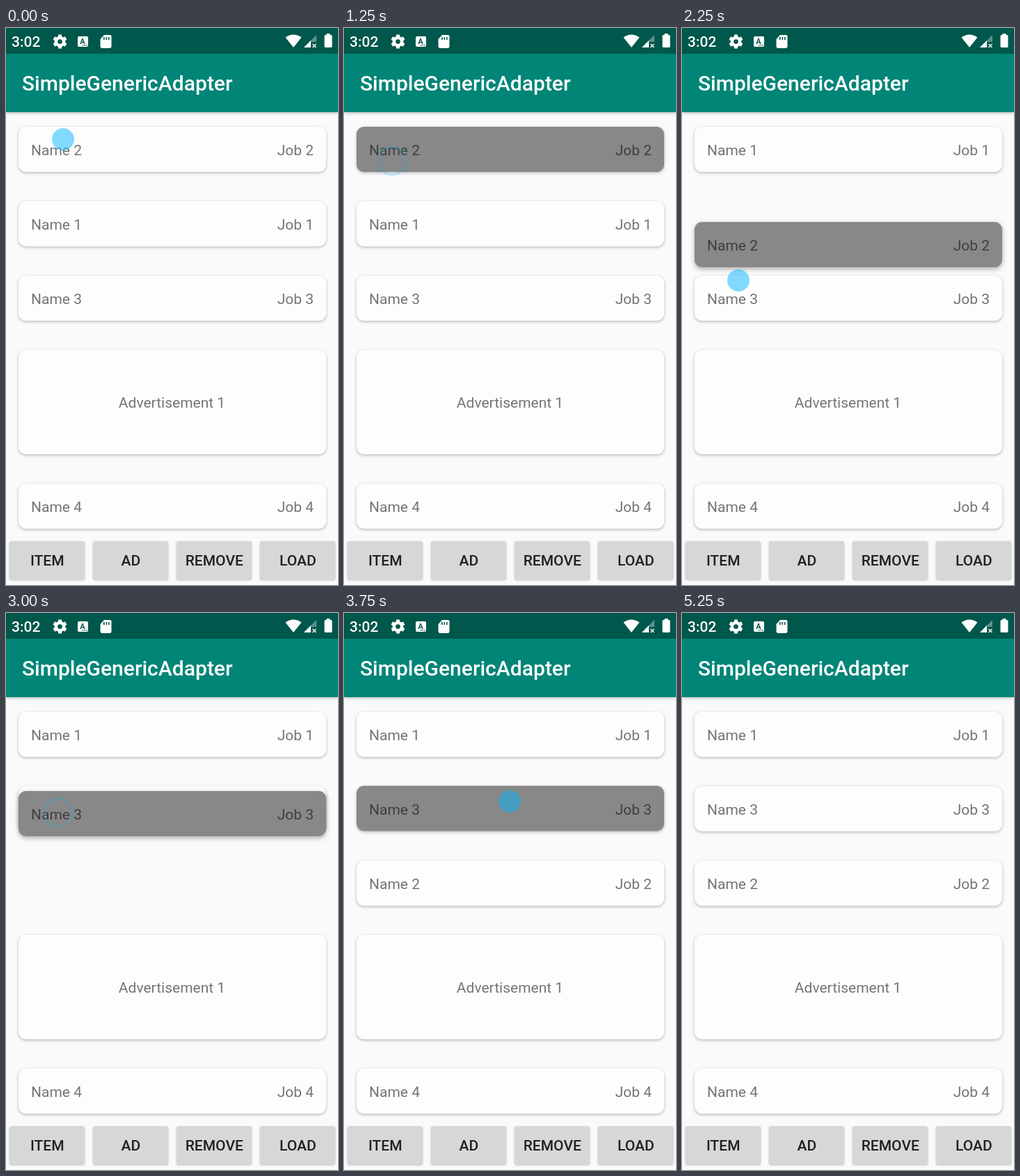
These frames come from a looping animation (477x801 px, 6.75 s). An HTML page with a canvas:

```html
<!DOCTYPE html>
<html lang="en">
<head>
<meta charset="utf-8">
<title>Drag and drop list</title>
<style>
  html, body { margin: 0; width: 100%; height: 100%; overflow: hidden; background: #fafafa; }
  canvas { display: block; }
</style>
</head>
<body>
<canvas id="stage" width="477" height="801"></canvas>
<script>
const c = document.getElementById('stage').getContext('2d');
const STEP = 250, STEPS = 27;
const TAU = Math.PI * 2;

// Pointer per step: x, y; a ring while pressed, a dot while hovering.
const pointer = [
  [82, 160], [84, 167], [85, 173], [86, 183], [68, 190, 1], [69, 191, 1], [72, 252, 1],
  [76, 322, 1], [79, 335, 1], [81, 363], [81, 373], [78, 397, 1], [75, 287, 1], [80, 251, 1],
  [85, 254, 1], [238, 271], [246, 279], [251, 302, 1], [255, 410, 1], [256, 417, 1], [258, 398]
];

// Held card per step: card number, top.
const held = {
  5: [2, 142], 6: [2, 203], 7: [2, 273], 8: [2, 286], 9: [2, 279],
  12: [3, 256], 13: [3, 220], 14: [3, 223], 15: [3, 248.5]
};

// Cards sliding to a new slot, and the overscroll glow (scale, alpha).
const sliding = { 7: [1, 221], 13: [2, 321] };
const glow = { 18: [.574, .12], 19: [.66, .145], 20: [.32, .07] };

function text(str, x, y, { size = 21, weight = 400, color = 'rgba(0,0,0,.54)', align = 'left' } = {}) {
  c.font = `${weight} ${size}px Roboto, sans-serif`;
  c.fillStyle = color;
  c.textAlign = align;
  c.fillText(str, x, y);
}

function box(x, y, w, h, r, color) {
  c.fillStyle = color;
  c.beginPath();
  c.roundRect(x, y, w, h, r);
  c.fill();
}

function shape(color, ...points) {
  c.fillStyle = color;
  c.beginPath();
  points.forEach(p => c.lineTo(...p));
  c.fill();
}

function withShadow(blur, dy, alpha, draw) {
  c.save();
  c.shadowColor = `rgba(0,0,0,${alpha})`;
  c.shadowBlur = blur;
  c.shadowOffsetY = dy;
  draw();
  c.restore();
}

function card(top, height, color, lifted) {
  withShadow(lifted ? 7 : 4, lifted ? 2.5 : 1.5, lifted ? .32 : .27,
    () => box(18, top, 442, height, 11, color));
}

function person(n, top, color = '#fdfdfd', lifted = false) {
  card(top, 65, color, lifted);
  text('Name ' + n, 36, top + 41);
  text('Job ' + n, 442, top + 41, { align: 'right' });
}

function list(step) {
  const order = step < 7 ? [2, 1, 3] : step < 13 ? [1, 2, 3] : [1, 3, 2];
  const drag = held[step], slide = sliding[step];
  order.forEach((n, i) => {
    if (drag && drag[0] === n) return;
    person(n, slide && slide[0] === n ? slide[1] : 142 + 107 * i);
  });
  card(463, 150, '#fdfdfd');
  text('Advertisement 1', 238.5, 546, { align: 'center' });
  person(4, 655);
  if (drag) person(...drag, '#888', step !== 5 && step !== 15);
}

function overscroll(step) {
  if (!glow[step]) return;
  const [scale, alpha] = glow[step], r = 572;
  c.save();
  c.beginPath();
  c.rect(0, 121, 477, 611);
  c.clip();
  c.fillStyle = `rgba(0,133,119,${alpha})`;
  c.beginPath();
  c.ellipse(246, 121 - r * .866 * scale, r, r * scale, 0, 0, TAU);
  c.fill();
  c.restore();
}

function statusIcons() {
  // Gear
  c.strokeStyle = '#fff';
  c.lineWidth = 4.5;
  c.beginPath();
  c.arc(77.5, 19.5, 5.6, 0, TAU);
  c.stroke();
  c.lineWidth = 5;
  for (let i = 0; i < 6; i++) {
    const a = i * TAU / 6 + TAU / 12, x = Math.cos(a), y = Math.sin(a);
    c.beginPath();
    c.moveTo(77.5 + 6 * x, 19.5 + 6 * y);
    c.lineTo(77.5 + 10 * x, 19.5 + 10 * y);
    c.stroke();
  }
  // Keyboard letter
  box(103, 12, 15, 15, 2, '#fff');
  text('A', 110, 23, { size: 11, weight: 700, color: '#00574b', align: 'center' });
  for (let x = 110; x < 117; x += 2.5) box(x, 24, 1.4, 1.4, 0, '#00574b');
  // Memory card
  shape('#fff', [141, 10], [150, 10], [151.5, 11.5], [151.5, 27], [150, 29], [137, 29], [135.5, 27], [135.5, 16]);
  for (let x = 140; x < 149; x += 3.5) box(x, 13, 1.6, 4, 0, '#00574b');
  // Wireless fan
  c.fillStyle = '#fff';
  c.beginPath();
  c.moveTo(413, 28);
  c.lineTo(401.5, 13.5);
  c.quadraticCurveTo(413, 5.5, 424.5, 13.5);
  c.fill();
  // Mobile signal
  shape('rgba(255,255,255,.35)', [428, 28], [446, 10], [446, 20], [438, 20], [438, 28]);
  shape('#fff', [428, 28], [438, 18], [438, 28]);
  c.lineWidth = 1.4;
  c.beginPath();
  c.moveTo(440.5, 23); c.lineTo(445.5, 28);
  c.moveTo(445.5, 23); c.lineTo(440.5, 28);
  c.stroke();
  // Battery
  box(460.5, 8, 5, 4, 0, '#fff');
  box(457.5, 10, 11, 18, 1.5, '#fff');
}

function bars() {
  withShadow(5, 1, .3, () => box(0, 37, 477, 84, 0, '#008577'));
  box(0, 0, 477, 37, 0, '#00574b');
  text('3:02', 8, 27, { weight: 500, color: '#fff' });
  statusIcons();
  text('SimpleGenericAdapter', 23, 90, { size: 30, weight: 500, color: '#fff' });
}

function buttons() {
  ['ITEM', 'AD', 'REMOVE', 'LOAD'].forEach((label, i) => {
    const x = 5 + 120 * i;
    withShadow(3, 1, .25, () => box(x, 738, 108, 55, 3, '#d6d7d7'));
    text(label, x + 54.3, 773, { weight: 500, color: '#212121', align: 'center' });
  });
}

function touch(step) {
  if (!pointer[step]) return;
  const [x, y, pressed] = pointer[step];
  c.beginPath();
  c.arc(x, y, pressed ? 20 : 16, 0, TAU);
  if (pressed) {
    c.lineWidth = 3;
    c.strokeStyle = 'rgba(0,181,255,.21)';
    c.stroke();
  } else {
    c.fillStyle = 'rgba(0,181,255,.49)';
    c.fill();
  }
}

function draw(now) {
  const step = Math.floor(now / STEP) % STEPS;
  box(0, 0, 477, 801, 0, '#fafafa');
  list(step);
  overscroll(step);
  bars();
  buttons();
  touch(step);
}

const start = performance.now();
function tick() {
  draw(performance.now() - start);
  requestAnimationFrame(tick);
}
tick();
</script>
</body>
</html>
```
